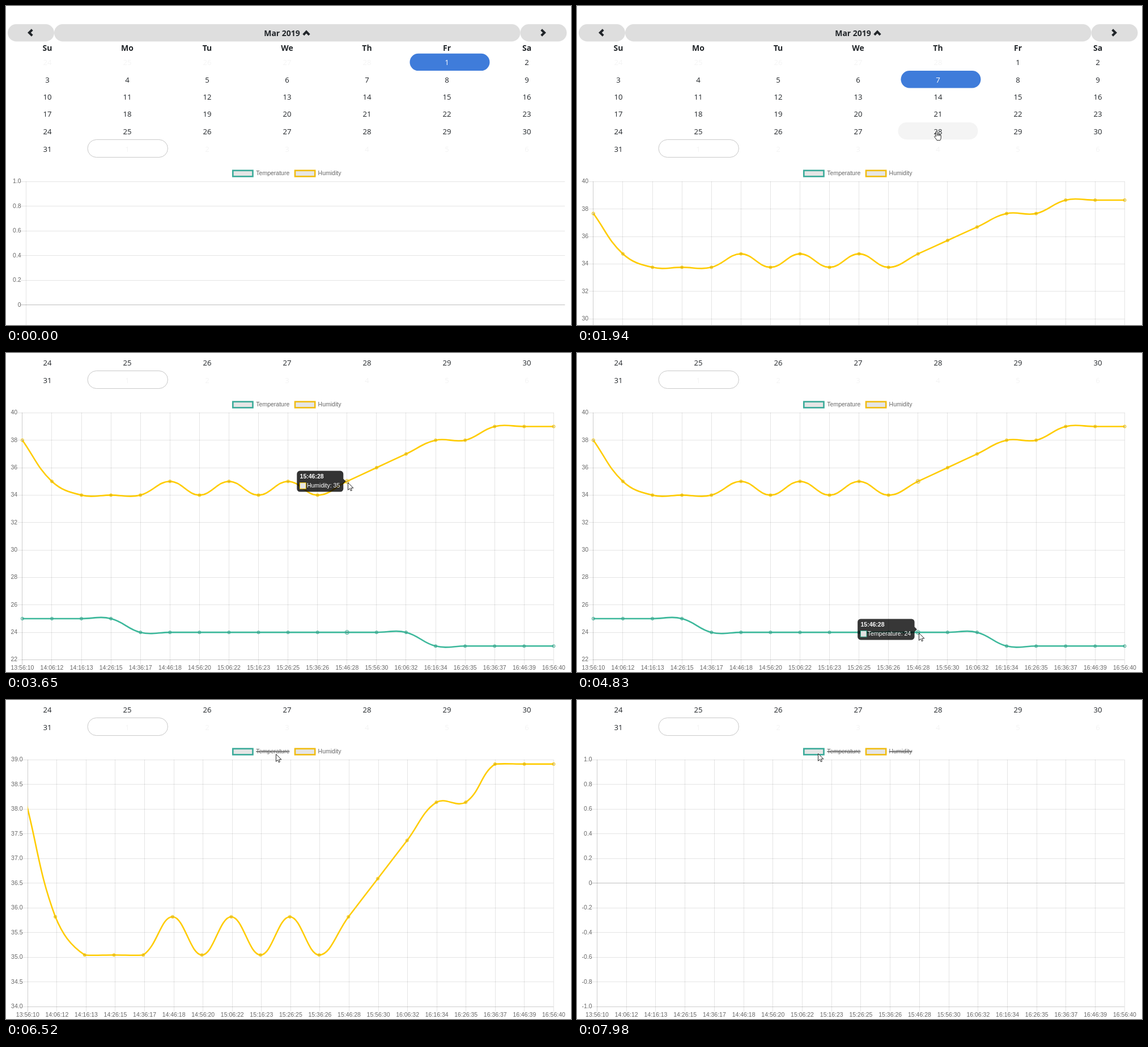
Recreate the animation shown at these times as an HTML page with a canvas. Size 997x562 px, loop 8000 ms.

```html
<!DOCTYPE html>
<html lang="en">
<head>
<meta charset="utf-8">
<title>Climate calendar</title>
<style>
  html, body { margin: 0; width: 100%; height: 100%; overflow: hidden; background: #fff; }
  canvas { display: block; }
</style>
</head>
<body>
<canvas id="stage" width="997" height="562"></canvas>
<script>
const ctx = document.getElementById('stage').getContext('2d');
const LOOP = 8000, LOAD = 1320, HIDE_TEMP = 6270, HIDE_HUM = 7070;
const TOP = 309.3, BOTTOM = 744.5, TICK = 8.8;
const SMALL = '10.5px "Liberation Sans", Arial, sans-serif';
const DAY = '13.2px "Open Sans", sans-serif';
const HEAD = 'bold 14px "Open Sans", sans-serif';
const INK = '#212529';

const temperature = [25, 25, 25, 25, 24, 24, 24, 24, 24, 24, 24, 24, 24, 24, 23, 23, 23, 23, 23];
const humidity = [38, 35, 34, 34, 34, 35, 34, 35, 34, 35, 34, 35, 36, 37, 38, 38, 39, 39, 39];
const seconds = [10, 12, 13, 15, 17, 18, 20, 22, 23, 25, 26, 28, 30, 32, 34, 35, 37, 39, 40];
const HOVERED = 11;
const labels = seconds.map((s, i) => {
  const m = 13 * 60 + 56 + i * 10;
  return `${Math.floor(m / 60)}:${String(m % 60).padStart(2, '0')}:${s}`;
});

const axes = {
  empty: { left: 35.5, right: 987, min: -1, max: 1, step: .2, digits: 1, bare: true },
  both: { left: 28.9, right: 966.4, min: 22, max: 40, step: 2, digits: 0 },
  humid: { left: 38.3, right: 966.4, min: 34, max: 39, step: .5, digits: 1 },
  none: { left: 35.5, right: 966.4, min: -1, max: 1, step: .2, digits: 1 },
};

// Pointer stops: time, x, y
const stops = [
  [150, 888, 502], [840, 634, 148], [920, 640, 145], [1000, 655, 126], [1150, 656, 136],
  [1480, 656, 136], [2050, 632, 229], [2300, 632, 229], [2560, 591, 222], [2680, 591, 222],
  [2940, 573, 227], [3200, 573, 227], [3400, 603, 228], [3850, 603, 228], [4100, 632, 350],
  [4430, 604, 495], [4560, 604, 495], [4640, 603, 493], [5340, 603, 493], [5900, 418, 76],
  [6120, 470, 94], [6230, 476, 95], [6560, 476, 95], [6900, 540, 94], [7120, 540, 94],
  [7750, 424, 94], [7960, 424, 94], [7980, 425, 94],
];
const arrow = new Path2D('M.5.5V13.4L3.5 10.6L5.4 14.9L7.4 14L5.6 9.9H10Z');
const hand = new Path2D('M3.5 10V1.8a1.3 1.3 0 0 1 2.6 0V6.5a1.2 1.2 0 0 1 2.3.2a1.2 1.2 0 0 1 2.2.5' +
  'a1.1 1.1 0 0 1 1.9.8V12q0 2-1.4 4.5H5.2Q4 14 1 10.6a1.2 1.2 0 0 1 2.5-1z');

const clamp = v => Math.max(0, Math.min(1, v));
const lerp = (a, b, p) => a + (b - a) * p;
const smooth = u => u * u * (3 - 2 * u);
const ramp = (t, start, length) => clamp((t - start) / length);
const easeOut = u => 1 - (1 - u) ** 4;

function text(s, x, y, font, color, align = 'center', baseline = 'middle') {
  ctx.font = font;
  ctx.fillStyle = color;
  ctx.textAlign = align;
  ctx.textBaseline = baseline;
  ctx.fillText(s, x, y);
}

// Calendar text, centred on the height of its capitals
const dateText = (s, x, y, font, color) => text(s, x, y + 5, font, color, 'center', 'alphabetic');

function pill(x, y, w, h, color, r = h / 2) {
  ctx.beginPath();
  ctx.roundRect(x, y, w, h, r);
  ctx.fillStyle = color;
  ctx.fill();
}

function chevron(x, y, angle) {
  ctx.save();
  ctx.translate(x, y);
  ctx.rotate(angle);
  ctx.beginPath();
  ctx.moveTo(-5.2, 2.8);
  ctx.lineTo(0, -2.6);
  ctx.lineTo(5.2, 2.8);
  ctx.lineWidth = 4;
  ctx.strokeStyle = INK;
  ctx.stroke();
  ctx.restore();
}

function pointer(t) {
  const n = stops.findIndex(s => s[0] > t);
  if (n === 0) return null;
  if (n < 0) return stops[stops.length - 1].slice(1);
  const [a, b] = [stops[n - 1], stops[n]];
  const p = smooth(ramp(t, a[0], b[0] - a[0]));
  return [lerp(a[1], b[1], p), lerp(a[2], b[2], p)];
}

// The page scrolls in visible jumps, one every 65 ms
function scrollTop(t) {
  const held = 2115 + Math.floor((t - 2115) / 65) * 65;
  return Math.round(204 * smooth(ramp(held, 2085, 278)));
}

function calendar(t) {
  pill(3, 32, 82, 30.5, '#dedede');
  pill(85, 32, 822.5, 30.5, '#dedede');
  pill(907.5, 32, 82, 30.5, '#dedede');
  chevron(43.5, 47, -Math.PI / 2);
  chevron(947.5, 47, Math.PI / 2);
  chevron(530, 48, 0);
  dateText('Mar 2019', 487, 47.5, HEAD, INK);
  ['Su', 'Mo', 'Tu', 'We', 'Th', 'Fr', 'Sa'].forEach((d, i) => dateText(d, 73 + i * 141, 74, HEAD, INK));

  const at = t < 2500 && pointer(Math.min(t, 2090));
  const selected = t < LOAD ? 1 : 7;
  for (let i = 0; i < 42; i++) {
    const row = Math.floor(i / 7), x = 2.5 + i % 7 * 141, y = 83.8 + row * 30.3;
    const day = i - 4, inside = day > 0 && day < 32;
    const over = at && inside && at[0] >= x && at[0] < x + 141 && at[1] >= y && at[1] < y + 30.3;
    if (day === selected) pill(x + 5, y, 141, 30.3, '#3f7cda');
    else if (over) pill(x, y, 141, 30.3, '#f4f4f4');
    if (day === 32) {
      ctx.beginPath();
      ctx.roundRect(144, 235.4, 141.5, 31.2, 15.6);
      ctx.lineWidth = 1;
      ctx.strokeStyle = '#c8c8c8';
      ctx.stroke();
    }
    const n = day < 1 ? day + 28 : day > 31 ? day - 31 : day;
    dateText(n, x + 70.5, y + 15.5 + (row === 5 ? .8 : 0), DAY, day === selected ? '#fff' : inside ? INK : '#f4f4f4');
  }
}

function legend(name, x, textX, color, hidden) {
  ctx.fillStyle = '#e5e5e5';
  ctx.fillRect(x, 289.8, 35.2, 10.5);
  ctx.lineWidth = 2.6;
  ctx.strokeStyle = color;
  ctx.strokeRect(x, 289.8, 35.2, 10.5);
  text(name, textX, 294.8, SMALL, '#666', 'left');
  if (hidden) {
    ctx.fillStyle = '#666';
    ctx.fillRect(textX, 294, ctx.measureText(name).width, 1.6);
  }
}

function grid(a) {
  const line = (x, y, w, h, alpha = .1) => {
    ctx.fillStyle = `rgba(0,0,0,${alpha})`;
    ctx.fillRect(Math.floor(x), Math.floor(y), w, h);
  };
  const count = Math.round((a.max - a.min) / a.step);
  for (let i = 0; i <= count; i++) {
    const y = lerp(TOP, BOTTOM, i / count), v = a.max - i * a.step, zero = Math.abs(v) < 1e-6;
    line(a.left - TICK, y, a.right - a.left + TICK, 1, zero ? .25 : .1);
    text(zero ? '0' : v.toFixed(a.digits), a.left - TICK, y, SMALL, '#666', 'right');
  }
  line(a.left, TOP, 1, BOTTOM - TOP + TICK);
  if (a.bare) return;
  line(a.left, BOTTOM, a.right - a.left, 1);
  labels.forEach((s, i) => {
    const x = lerp(a.left, a.right, i / 18);
    line(x, TOP, 1, BOTTOM - TOP + TICK);
    text(s, x, BOTTOM + 15, SMALL, '#666');
  });
}

// Each knot: point, incoming handle, outgoing handle
function knots(values, a) {
  const pts = values.map((v, i) => [
    lerp(a.left, a.right, i / 18),
    lerp(BOTTOM, TOP, (v - a.min) / (a.max - a.min)),
  ]);
  const cap = (x, y) => [
    Math.max(a.left, Math.min(a.right, x)),
    Math.max(TOP, Math.min(BOTTOM, y)),
  ];
  return pts.map((p, i) => {
    const q = pts[i - 1] || p, r = pts[i + 1] || p;
    const before = Math.hypot(p[0] - q[0], p[1] - q[1]), after = Math.hypot(r[0] - p[0], r[1] - p[1]);
    const k = .4 / (before + after), dx = r[0] - q[0], dy = r[1] - q[1];
    return [...p,
      ...cap(p[0] - k * before * dx, p[1] - k * before * dy),
      ...cap(p[0] + k * after * dx, p[1] + k * after * dy)];
  });
}

const mix = (from, to, p) => from.map((k, i) => k.map((v, j) => lerp(v, to[i][j], p)));

function series(ks, a, color, hover) {
  ctx.save();
  ctx.beginPath();
  ctx.rect(a.left, TOP - 1.3, a.right - a.left, BOTTOM - TOP + 2.6);
  ctx.clip();
  ctx.beginPath();
  ks.forEach((k, i) => {
    if (!i) return ctx.moveTo(k[0], k[1]);
    const b = ks[i - 1];
    ctx.bezierCurveTo(b[4], b[5], k[2], k[3], k[0], k[1]);
  });
  ctx.lineWidth = 2.6;
  ctx.lineJoin = 'miter';
  ctx.strokeStyle = color;
  ctx.stroke();
  ctx.restore();
  ctx.lineWidth = 1;
  ctx.strokeStyle = color;
  ctx.fillStyle = 'rgba(0,0,0,.1)';
  ks.forEach((k, i) => {
    if (k[0] < a.left - .01) return;
    ctx.beginPath();
    ctx.arc(k[0], k[1], i === HOVERED ? lerp(2.6, 3.6, hover) : 2.6, 0, 7);
    ctx.fill();
    ctx.stroke();
  });
}

function tooltip(x, y, w, body, color, alpha) {
  if (alpha < .01) return;
  const h = 37, mid = y + h / 2, right = x + w;
  ctx.save();
  ctx.globalAlpha = alpha;
  ctx.beginPath();
  ctx.roundRect(x, y, w, h, 5.3);
  ctx.moveTo(right, mid - 4.4);
  ctx.lineTo(right + 4.4, mid);
  ctx.lineTo(right, mid + 4.4);
  ctx.fillStyle = 'rgba(0,0,0,.8)';
  ctx.fill();
  text(labels[HOVERED], x + 5.3, y + 10.6, 'bold ' + SMALL, '#fff', 'left');
  ctx.fillStyle = '#e5e5e5';
  ctx.fillRect(x + 5.3, y + 21.1, 10.5, 10.5);
  ctx.lineWidth = 1;
  ctx.strokeStyle = color;
  ctx.strokeRect(x + 5.3, y + 21.1, 10.5, 10.5);
  text(body, x + 17.6, y + 26.5, SMALL, '#fff', 'left');
  ctx.restore();
}

function chart(t) {
  const a = t < LOAD ? axes.empty : t < HIDE_TEMP ? axes.both : t < HIDE_HUM ? axes.humid : axes.none;
  legend('Temperature', 400.3, 441.3, '#3aaa99', t >= HIDE_TEMP);
  legend('Humidity', 510, 550.6, '#f0bc12', t >= HIDE_HUM);
  grid(a);

  const fade = (start, end) => easeOut(ramp(t, start, 400)) - easeOut(ramp(t, end, 400));
  const first = fade(3270, 3950), second = fade(4580, 5400), hover = first + second;
  const teal = '#3cb89b', yellow = '#ffcc00';
  const floor = new Array(19).fill(axes.both.min);
  const rise = values => mix(knots(floor, axes.both), knots(values, axes.both), easeOut(ramp(t, LOAD, 1000)));
  if (a === axes.both) {
    series(rise(humidity), a, yellow, hover);
    series(rise(temperature), a, teal, hover);
  } else if (a === axes.humid) {
    const p = easeOut(ramp(t, HIDE_TEMP, 1000));
    series(mix(knots(humidity, axes.both), knots(humidity, a), p), a, yellow, 0);
  }

  const slide = easeOut(ramp(t, 4580, 400));
  if (t < 4580) tooltip(513.3, 411.6, 82, 'Humidity: 35', yellow, first);
  else tooltip(lerp(513.3, 494.8, slide), lerp(411.6, 677.5, slide), lerp(82, 100.8, slide), 'Temperature: 24', teal, second);
}

function cursor(t) {
  const at = pointer(t);
  if (!at) return;
  const isHand = t < 2400 && at[1] < 267;
  ctx.save();
  ctx.translate(at[0] - (isHand ? 4.5 : 0), at[1]);
  ctx.fillStyle = '#fff';
  ctx.strokeStyle = '#111';
  ctx.lineWidth = .9;
  ctx.fill(isHand ? hand : arrow);
  ctx.stroke(isHand ? hand : arrow);
  if (isHand) {
    ctx.beginPath();
    for (const x of [6.1, 8.4, 10.6]) {
      ctx.moveTo(x, 6.5);
      ctx.lineTo(x, 9);
    }
    ctx.stroke();
  }
  ctx.restore();
}

function draw(now) {
  const t = now % LOOP;
  ctx.fillStyle = '#fff';
  ctx.fillRect(0, 0, 997, 562);
  ctx.save();
  ctx.translate(0, -scrollTop(t));
  calendar(t);
  chart(t);
  ctx.restore();
  cursor(t);
}

const start = performance.now();
function tick() {
  draw(performance.now() - start);
  requestAnimationFrame(tick);
}
tick();
</script>
</body>
</html>
```
